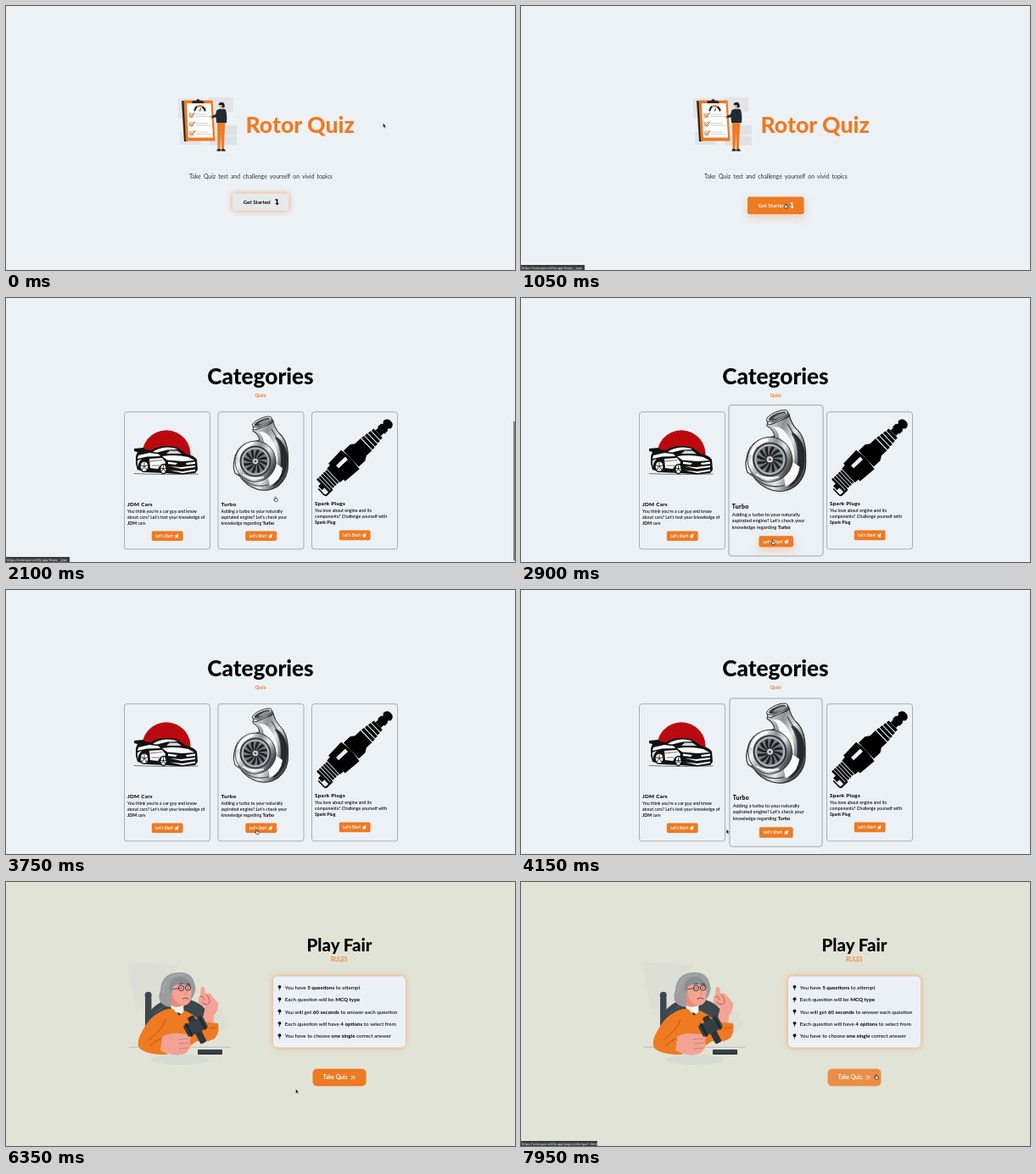
These frames come from a looping animation (600 by 312 pixels, 8 s). An HTML page:

```html
<!DOCTYPE html>
<html lang="en">
<head>
<meta charset="utf-8">
<title>Rotor Quiz</title>
<style>
  html, body { margin: 0; width: 100%; height: 100%; overflow: hidden; background: #ebf1f5; }
  svg { display: block; width: 100%; height: 100%; }
  text { font-family: Lato, "Open Sans", sans-serif; font-size: 5.2px; font-weight: 500; fill: #000; white-space: pre; }
  .b { font-weight: 700; }
  .heavy { font-weight: 800; }
  .mid { text-anchor: middle; }
  .orange { fill: #ee7a21; }
  .white { fill: #fff; }
  .name { font-size: 6.3px; letter-spacing: .3px; }
  .rule { font-size: 6.22px; }
  .card { fill: #ebf1f5; stroke: #8c9196; stroke-width: .7; }
  .glow { filter: drop-shadow(0 0 3px #f4a06a); }
  .drop { filter: drop-shadow(0 4px 5px #f3945066); }
  .line { fill: none; stroke-linecap: round; stroke-linejoin: round; }
  #status text { font: 4px Roboto, sans-serif; fill: #f2f2f2; }
</style>
</head>
<body>
<svg id="stage" viewBox="0 0 600 312"></svg>
<script>
const ORANGE = '#ee7a21';
const path = (d, fill, extra = '') => `<path d="${d}" fill="${fill}" ${extra}/>`;
const line = (d, color, width) => `<path class="line" d="${d}" stroke="${color}" stroke-width="${width}"/>`;
const rect = (x, y, w, h, fill, r = 0, extra = '') =>
  `<rect x="${x}" y="${y}" width="${w}" height="${h}" rx="${r}" fill="${fill}" ${extra}/>`;
const oval = (x, y, rx, ry, fill, extra = '') =>
  `<ellipse cx="${x}" cy="${y}" rx="${rx}" ry="${ry}" fill="${fill}" ${extra}/>`;
const text = (x, y, content, cls = '', size = '') =>
  `<text x="${x}" y="${y}" class="${cls}" ${size && `style="font-size:${size}px"`}>${content}</text>`;
const bold = s => `<tspan class="b">${s}</tspan>`;
const repeat = (n, draw) => Array.from({ length: n }, (_, i) => draw(i)).join('');

const checklistArt = () =>
  rect(203, 109, 28, 24, '#e1e5e7') + rect(239, 108, 29, 17, '#e1e5e7') +
  rect(205, 149, 25, 15, '#e1e5e7') + rect(240, 141, 32, 24, '#dfe2e4') +
  line('M204 134H272M205 165H270M240 153H272M229 167V172M206 169H240', '#f4f6f7', .8) +
  path('M207 112H211L214 160H210Z', '#24272d') +
  path('M209.500 111.500H243.500L246.500 159.500H212Z', ORANGE) +
  path('M213 115H241.500L244 155.500H215Z', '#fff') +
  path('M219 115L220 112H224Q226 108 229 112H232L234 115Z', '#24272d') +
  line('M222.500 123.500A6 6 0 0 1 225 119', '#24272d', 2.2) +
  line('M226 118.500A6 6 0 0 1 231 118.800', ORANGE, 2.2) +
  line('M232 119.500A6 6 0 0 1 234.500 123.500', '#24272d', 2.2) +
  line('M228.500 124L229.500 121', '#24272d', 1) +
  repeat(3, i => {
    const y = 127 + i * 10.6, x = 216 + i * .3;
    return rect(x, y, 4.5, 4.5, '#fff', .4, 'stroke="#6a6d72" stroke-width=".6"') +
      line(`M${x + 1} ${y + 2}l1.500 1.700l4-4.500`, ORANGE, 1.2) +
      line(`M${x + 8} ${y + 1}h13m-13 2.500h17`, '#b8bbbe', .7);
  }) +
  path('M249 136H258.500L257.500 152L257 169H254L253.500 150L252.500 169H249.500Z', ORANGE) +
  path('M249 169H253V171.500H248.500ZM254 169H257.500L259 171.500H253.500Z', '#1d2228') +
  path('M248.500 123Q254 120 259 122.500Q261 129 260 138H248L247.500 131.500L242 132.500L241.500 130.500L247 128Z', '#222b33') +
  rect(253, 118, 3, 4, '#e9a48b') + oval(254, 117, 2.6, 3, '#e9a48b') +
  path('M250.500 117Q251 113.500 255 113.800Q258.500 115 257.500 120L255 120L254.500 117Z', '#1d2228') +
  oval(241.800, 131, 1.2, 1, '#e9a48b');

const carWheel = (x, y, rx, ry) =>
  oval(x, y, rx, ry, '#111') + oval(x, y, rx - 1.5, ry - 1.5, '#fff') +
  repeat(5, i => `<path transform="translate(${x} ${y}) rotate(${i * 72})" d="M0 0V${1.7 - ry}" stroke="#111" stroke-width=".8"/>`);

const carArt = () =>
  path('M161 190A28.500 28.500 0 1 1 217 190Z', '#bb0a0f') +
  oval(187, 166, 1.5, 1.3, 'none', 'stroke="#8f1012" stroke-width=".5"') +
  path('M151 178L162 177L164 179L171 180Q178 174.500 190 175Q200 175 204 178L212 184Q222 186 225 191L226 203L223 207L208 208.500L188 207L166 206L155 203L153 196L153 187L155 182L151 181Z', '#111') +
  path('M156 186L169 183L180 184.500L182 187L166 187.500L155 190Z', '#fff') +
  path('M173 182Q179 177 190 176.500Q199 176.500 202 179L190 179.500L178 182.500Z', '#fff') +
  path('M189 184L193 180.500L202 180.500L207 184Z', '#cfd3d6') +
  path('M184 187Q200 184.500 215 188L222 192L208 193L190 191.500Z', '#fff') +
  path('M169 190L184 189L188 194L187 197Q182 196 179 202L170 201Z', '#fff') +
  path('M155 192L160 190Q156 194 155 200Z', '#fff') +
  path('M191 193.500L202 195L200 197L191 196ZM212 195L223 193.500V196L213 197Z', '#fff') +
  path('M193 199L206 200L223 198V200L207 202ZM193 203.500L208 205L223 202.500V204.500L208 207Z', '#fff') +
  carWheel(163, 199, 5.8, 7) + carWheel(185.500, 202, 4.5, 6.2) +
  line('M153 179.500L162 179M170 193L184 191.500M172 198L181 198', '#111', .6) +
  line('M151 207.500Q180 209 226 208', '#222', .6);

const turboArt = () =>
  path('M291 155L315 146Q317 154 322 160Q332 168 332.500 188V196Q333 212 321 222Q309 230 296 226Q283 222 276 211L270 207Q267 199 269 192Q271 179 281 173L299 168Q298 161 291 157Z',
    'url(#steel)', 'stroke="#222" stroke-width="1"') +
  path('M319 164Q332 174 331.500 191Q331 214 314 223Q324 209 324 192Q324 176 317 165Z', '#26282b') +
  path('M301 158Q308 158 314 169Q322 181 320 197Q316 178 304 170Q303 162 297 158Z', '#f7f8f8') +
  line('M313 155Q322 168 324 182M274 208Q287 226 309 221M299 169Q289 170 283 175', '#45484c', 1.2) +
  path('M309 212Q317 206 319 196L326 201Q324 216 311 222Z', '#fafafa') +
  `<g transform="rotate(-23 303 149)">` + rect(290.500, 146, 25, 6, 'url(#steel)', 2.5, 'stroke="#222" stroke-width=".8"') +
  oval(303, 146, 12.300, 4.3, '#e6e8e9', 'stroke="#222" stroke-width=".8"') + oval(303, 146.300, 10, 3, '#3a3c3f') +
  oval(305, 147, 7, 1.7, '#8d9195') + '</g>' +
  oval(294, 193, 24, 24, 'url(#steel)', 'stroke="#222" stroke-width=".8"') +
  line('M274 187Q278 174 291 172', '#fff', 2.5) + line('M280 209Q290 216 303 212', '#fff', 1.8) +
  oval(294, 193, 18.500, 18.500, '#33363a') + oval(294, 193, 16.500, 16.500, '#b3b7ba') + oval(294, 193, 14.500, 14.500, '#777b7f') +
  repeat(12, i => `<path transform="rotate(${i * 30} 294 193)" d="M294 192Q292 185 296 179L299 180Q295 186 294 192" fill="#1d1f22"/>`) +
  oval(294, 193, 3.7, 3.7, '#d8dadc', 'stroke="#222" stroke-width=".7"') + oval(294, 193, 1.4, 1.4, '#555');

const plugArt = () =>
  `<g transform="translate(371 224) rotate(-43.500) scale(1 1.3)">` +
  line('M8 8.500H-1Q-3 8.500 -3 6V0', '#000', 1.6) +
  repeat(5, i => rect(3 + i * 3.5, -8, 2.7, 16, '#000', .8)) +
  rect(-1, -2.500, 6, 5, '#000') +
  path('M20.500 -8.500L26 -9V-11L48 -12Q51 0 48 12L26 11V9L20.500 8.500ZM49.500 -10H60L65 -7.500H74V7.500H65L60 10H49.500Z', '#000') +
  path('M31 -5H46V-1.500H31Z', '#ebf1f5') +
  repeat(4, i => rect(75.200 + i * 4.800, i * .5 - 7.300, 3.7, 14.600 - i, '#000', .5)) +
  path('M93.500 -3.500H98V-4.500H103L105 -3L108 -5Q114 -4.500 114 0Q114 4.500 108 5L105 3L103 4.500H98V3.500H93.500Z', '#000') +
  '</g>';

const judgeArt = () =>
  path('M143 95L203 98L181 151L153 151Z', '#dddfd6') + path('M232 120L263 168L238 192Z', '#dcdfd5') +
  oval(205, 210, 34, 6, '#d7dad3') +
  rect(164, 136, 7.500, 58, '#3d474e', 2) + oval(167.700, 134, 4, 4.2, '#3d474e') +
  path('M171 151Q184 137 204 137Q231 139 239 157V188H171Z', '#3d474e') +
  line('M175 155Q188 143 203 143', '#59646a', 1) +
  path('M183 143Q178 137 182 128Q183 109 201 107Q218 105 222 119Q226 128 219 138Q214 148 200 146Q190 150 183 143Z', '#9b9d9e') +
  path('M194 133L205 127L210 146L206 155L195 151Z', '#e58d7e') +
  path('M197 123Q200 117 210 117L217 120Q220 132 217 141Q213 148 206 145Q198 142 196 132Z', '#f3a393') +
  path('M196 131Q193 124 202 121Q211 120 219 125Q216 114 207 112Q194 112 192 126Z', '#8b8e90') +
  line('M187 118Q195 108 208 110M185 131Q185 122 190 118', '#b3b5b6', .8) +
  line('M196 127L204 125.500', '#262b30', .7) +
  '<g fill="none" stroke="#262b30" stroke-width=".9"><circle cx="206.500" cy="125.500" r="3.200"/><circle cx="214.500" cy="125" r="3.100"/></g>' +
  line('M206 125.500h1M214 125h1M204 121L208 120M213 120L217 121', '#262b30', .8) +
  line('M211.500 127L213.500 132L211 132.500', '#d97e70', .7) + line('M208 138Q212 135.500 215 138', '#a13b34', 1) +
  path('M194 146L201 148L209 146L210 158L203 154L197 157Z', '#f5f5f3') +
  path('M230 168L235 148L228 144Q225 138 229 134L230 125Q232 122 234 126L235 132Q241 130 243 135L250 143Q251 151 245 158L244 172Z', '#f3a393') +
  line('M229 135Q233 135 234 139M236 133Q240 136 240 142M231 142Q235 147 240 143', '#ad594f', .9) +
  path('M181 154Q190 149 197 150L204 158L211 152Q224 158 230 165L250 167Q252 176 247 184Q239 190 225 188L214 196L188 204Q165 204 157 196Q153 188 162 174Q169 160 181 154Z', ORANGE) +
  line('M188 163Q183 176 169 186M187 184Q177 186 170 194M213 161Q220 172 233 176M240 173L247 172', '#ab500e', .8) +
  path('M184 183Q194 178 203 179L215 180Q219 183 217 187L218 192Q218 196 215 198Q214 203 206 204Q194 206 182 199Z', '#f3a393') +
  line('M203 186L215 185M204 191L217 190M204 197L215 196', '#c9756a', .8) +
  `<g transform="rotate(-27 225 174)">` + rect(221, 157, 8, 35, '#2c353b', 2) +
  rect(212, 163, 26, 15, '#333e45', 2) + rect(215, 162, 2.500, 17, '#1f272c') + rect(233, 162, 2.500, 17, '#1f272c') + '</g>' +
  line('M145 195.300H157M219 195.300H264', '#9a9d96', .5) +
  rect(226, 198, 29, 6, '#2f393f', 1) + line('M228 200H253', '#56616a', .6);

const cards = [
  { x: 139.5, dy: 0, name: 'JDM Cars', art: carArt, lines: ["You think you're a car guy and know", "about cars? Let's test your knowledge of", bold('JDM') + ' cars'] },
  { x: 250, dy: 0, name: 'Turbo', art: turboArt, lines: ['Adding a turbo to your naturally', "aspirated engine? Let's check your", 'knowledge regarding ' + bold('Turbo')] },
  { x: 360.5, dy: -.8, name: 'Spark Plugs', art: plugArt, lines: ['You love about engine and its', 'components? Challenge yourself with', bold('Spark Plug')] },
];
const drawCard = ({ x, dy, name, art, lines }, i) => `<g id="card${i}">` +
  rect(x, 134.6, 101, 162.2, '', 3, 'class="card"') + art() +
  text(x + 3.5, 246 + dy, name, 'heavy name') +
  lines.map((s, n) => text(x + 3.5, 253.8 + dy + n * 7, s)).join('') +
  rect(x + 32.3, 275.4 + dy, 36.8, 11.6, ORANGE, 1.7, `id="go${i}"`) +
  text(x + 36.7, 283 + dy, "Let's Start", 'b white', 4.7) +
  path(`M${x + 59} ${281.1 + dy}l5-2.600l-1 5.300l-1.600-1l-1.200 1.400v-2l2.600-2.800l-3.300 2.400z`, '#fff') + '</g>';

const rules = [
  `You have ${bold('5 questions')} to attempt`,
  `Each question will be ${bold('MCQ type')}`,
  `You will get ${bold('60 seconds')} to answer each question`,
  `Each question will have ${bold('4 options')} to select from`,
  `You have to choose ${bold('one single')} correct answer`,
];

stage.innerHTML = `
<defs><linearGradient id="steel" x2="1" y2=".5">
  <stop stop-color="#777b7f"/><stop offset=".3" stop-color="#f4f5f6"/><stop offset=".55" stop-color="#8d9195"/>
  <stop offset=".75" stop-color="#e5e7e8"/><stop offset="1" stop-color="#4a4e52"/>
</linearGradient></defs>
<g id="home">${rect(0, 0, 600, 312, '#ebf1f5')}
  <g id="scroller">
    ${checklistArt()}
    ${text(282.5, 149.5, 'Rotor Quiz', 'heavy orange', 26.6)}
    <text x="216" y="203.500" style="font-size:6.9px;word-spacing:1.4px;fill:#3c4247">Take Quiz test and challenge yourself on vivid topics</text>
    <g id="start">
      ${rect(267, 221.5, 66.5, 20.5, '#e8e9e9', 2, 'class="glow" id="startIdle"')}
      ${rect(267, 221.5, 66.5, 20.5, ORANGE, 2, 'class="drop" id="startHover"')}
      <g id="startLabel">${text(279.5, 234, 'Get Started', 'b', 6.3).replace('style="', 'style="fill:inherit;')}
        <path d="M317.500 228.300h2.800v4.700h1.500l-2.200 2.500l-2.200-2.500h1.500v-3.300h-1.400z"/></g>
    </g>
    <g transform="translate(0 275)">
      ${text(300, 102, 'Categories', 'heavy mid', 26.2)}
      ${text(300, 117, 'Quiz', 'b mid orange', 6.3)}
      ${cards.map(drawCard).join('')}
    </g>
  </g>
  ${rect(598, 0, 2, 165, '#7d8083', 1, 'id="bar"')}
</g>
<g id="fair">${rect(0, 0, 600, 312, '#e1e3d6')}
  ${judgeArt()}
  ${text(393, 81.5, 'Play Fair', 'heavy mid', 20.4)}
  ${text(392.8, 94, 'RULES', 'mid orange', 6.6)}
  ${rect(315, 111.5, 156, 84, '#ebf0f7', 5, 'class="glow"')}
  ${rules.map((s, i) => {
    const y = 127 + i * 14.35;
    return oval(322.5, y - 3.2, 1.9, 1.9, '#111') + line(`M322.500 ${y - 2}V${y + .7}`, '#111', .7) + text(328.8, y, s, 'rule');
  }).join('')}
  <g id="take">${rect(361.5, 220.7, 63, 20.5, ORANGE, 5)}
    ${text(373.7, 233.3, 'Take Quiz', 'b white', 6.6)}
    ${line('M406.800 229l2 2l-2 2m2.600-4l2 2l-2 2', '#fff', 1)}</g>
</g>
<g id="status">${rect(0, 306, 75, 6, '#3b3d40')}<text x="1" y="310.600"></text></g>
<g id="cursor">
  <path id="arrow" d="M0 0V5.200L1.200 4.200L2 6L2.900 5.600L2.100 3.900H3.700Z" fill="#000" stroke="#fff" stroke-width=".4"/>
  <path id="hand" transform="scale(.9)" d="M-.600 .500Q0 -.300 .600 .500V2.300L2.800 2.800Q3.300 3 3.200 4L2.700 6H-.600L-2.200 3.600Q-1.600 2.800 -.600 3.900Z" fill="#fff" stroke="#000" stroke-width=".7"/>
</g>`;

const $ = id => document.getElementById(id);
const show = (el, on) => el.setAttribute('visibility', on ? 'visible' : 'hidden');
const ease = (t, start, duration) => {
  const p = Math.min(1, Math.max(0, (t - start) / duration));
  return p * p * (3 - 2 * p);
};
const pulse = (t, on, off, d = 180) => ease(t, on, d) * (1 - ease(t, off, d));
const within = (t, spans) => spans.find(([a, b]) => t >= a && t < b);

const track = [
  [0, 444.5, 138.5], [80, 444.5, 138.5], [800, 306, 231], [1150, 313, 234], [1650, 317.5, 235], [2200, 317.5, 235],
  [2800, 296.5, 286], [3120, 296.5, 286], [3380, 385, 283], [3540, 385, 283], [3740, 295.5, 283], [3930, 293, 284],
  [4300, 214, 282], [4700, 208.5, 287.5], [5700, 208.5, 287.5], [6300, 341.5, 244.5], [6500, 341.5, 244.5],
  [6850, 365, 212], [7300, 396, 206], [7600, 412, 215], [7800, 418.5, 227.5], [8000, 418.5, 227.5],
];
const handSpans = [[740, 2120], [2700, 3200], [3690, 3980], [4500, 5450], [7690, 8000]];
const site = 'https://rotorquiz.netlify.app/';
const links = [
  [900, 2150, '#quiz__type', 75], [4650, 6080, 'pages/jdm/rules.html', 91], [7740, 8000, 'pages/jdm/que1.html', 90],
];

function draw(t) {
  const scroll = 275 * ease(t, 1374, 690);
  $('scroller').setAttribute('transform', `translate(0 ${-scroll})`);
  $('bar').setAttribute('y', scroll * 312 / 590);
  $('bar').setAttribute('opacity', pulse(t, 1374, 2560, 150));

  const start = ease(t, 720, 200), shade = 255 * start;
  $('start').setAttribute('transform', `translate(0 ${4 * start})`);
  $('startIdle').setAttribute('opacity', 1 - start);
  $('startHover').setAttribute('opacity', start);
  $('startLabel').setAttribute('fill', `rgb(${shade},${shade},${shade})`);

  const hovers = [
    pulse(t, 4150, 9000),
    Math.max(pulse(t, 2100, 3230), pulse(t, 3770, 4100)),
    pulse(t, 3310, 3560),
  ];
  const pressed = [t > 4500, t > 2720 && t < 3200, false];
  hovers.forEach((h, i) => {
    const cx = cards[i].x + 50.5, cy = 215.7;
    $('card' + i).setAttribute('transform', `translate(${cx} ${cy}) scale(${1 + .1 * h}) translate(${-cx} ${-cy})`);
    $('go' + i).setAttribute('class', pressed[i] ? 'drop' : '');
  });

  show($('fair'), t >= 5450);
  $('take').setAttribute('opacity', 1 - .2 * ease(t, 7690, 150));

  const link = within(t, links);
  show($('status'), link);
  if (link) {
    $('status').children[0].setAttribute('width', link[3]);
    $('status').children[1].textContent = site + link[2];
  }

  const k = track.findIndex(p => p[0] > t), [t0, x0, y0] = track[k - 1], [t1, x1, y1] = track[k];
  const p = ease(t, t0, t1 - t0);
  $('cursor').setAttribute('transform', `translate(${x0 + (x1 - x0) * p} ${y0 + (y1 - y0) * p})`);
  const hand = within(t, handSpans);
  show($('hand'), hand);
  show($('arrow'), !hand);
}

const begin = performance.now();
function tick() {
  draw((performance.now() - begin) % 8000);
  requestAnimationFrame(tick);
}
tick();
</script>
</body>
</html>
```
